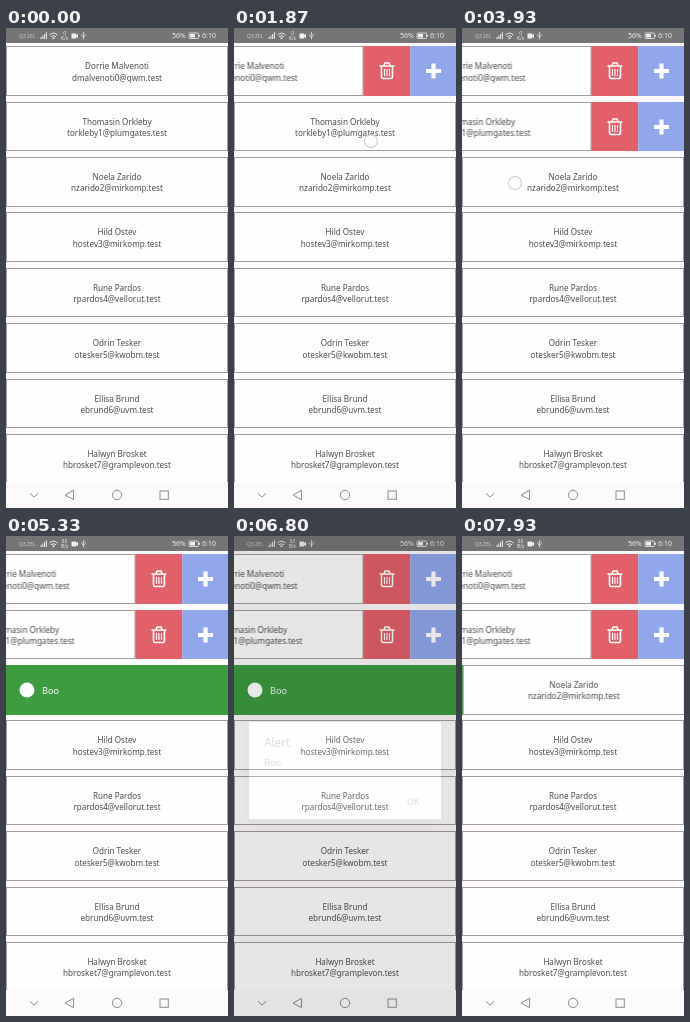
Write an HTML page that moves like this. It is 222 px wide and 480 px high and loops after 8000 ms.

```html
<!DOCTYPE html>
<html lang="en">
<head>
<meta charset="utf-8">
<title>Swipeable contact list</title>
<style>
  html, body { margin: 0; width: 100%; height: 100%; overflow: hidden; background: #fdfafc; }
  #stage {
    position: relative; width: 222px; height: 480px; overflow: hidden;
    background: #fdfafc; color: #4c4c4c;
    font: 8.1px/11.4px "Noto Sans", "Open Sans", sans-serif;
  }
  #stage > * { position: absolute; }
  svg { font-family: "Noto Sans", "Open Sans", sans-serif; }
  #list { left: 0; top: 0; }
  .row { position: absolute; left: 0; width: 222px; height: 49.6px; overflow: hidden; }
  .row > * { position: absolute; top: 0; height: 100%; }
  .card {
    box-sizing: border-box; width: 222px; padding-top: 13px;
    border: 1px solid #a19c9e; background: #fefefe; text-align: center;
  }
  .card div { white-space: nowrap; }
  .actions { left: 129.5px; width: 92.5px; }
  .boo { width: 222px; background: #3d9b40; }
  .bar { left: 0; width: 222px; }

  .row:nth-child(1) .card, .row:nth-child(2) .card, .row:nth-child(3) .card,
  #touch, #alert, .idle, .busy { animation: 8s linear infinite; }
  .row:nth-child(1) .card { animation-name: open-first; }
  .row:nth-child(2) .card { animation-name: open-second; }
  .row:nth-child(3) .card { animation-name: open-third; }

  @keyframes open-first {
    0%, 9.5% { transform: none; }
    18% { transform: translateX(-80px); animation-timing-function: ease-out; }
    22%, 100% { transform: translateX(-92.5px); }
  }
  @keyframes open-second {
    0%, 24% { transform: none; }
    36% { transform: translateX(-84px); animation-timing-function: ease-out; }
    43%, 100% { transform: translateX(-92.5px); }
  }
  @keyframes open-third {
    0%, 50% { transform: none; }
    60% { transform: translateX(130px); animation-timing-function: ease-out; }
    66%, 89% { transform: translateX(222px); }
    93.5% { transform: translateX(110px); animation-timing-function: cubic-bezier(.15, .75, .4, 1); }
    99%, 100% { transform: translateX(.8px); }
  }

  #touch {
    left: -7px; top: -7px; width: 14px; height: 14px; box-sizing: border-box;
    border: 1px solid rgba(190, 185, 190, .75); border-radius: 50%;
    background: rgba(250, 250, 252, .65);
    animation-name: drag, press !important;
  }
  @keyframes drag {
    0%, 9.5% { transform: translate(150px, 45px); }
    18%, 21% { transform: translate(70px, 45px); }
    21.01%, 24% { transform: translate(137px, 113px); }
    36%, 45% { transform: translate(53px, 113px); }
    45.01%, 50% { transform: translate(53px, 155px); }
    60%, 68% { transform: translate(183px, 155px); }
    68.01%, 76% { transform: translate(60px, 155px); }
    76.01%, 86% { transform: translate(180px, 266px); }
    86.01%, 89% { transform: translate(190px, 155px); }
    93.5%, 100% { transform: translate(78px, 155px); }
  }
  @keyframes press {
    0%, 8.3% { opacity: 0; }
    8.6%, 18% { opacity: 1; }
    18.6%, 23% { opacity: 0; }
    23.3%, 36% { opacity: 1; }
    37%, 48.7% { opacity: 0; }
    49%, 60% { opacity: 1; }
    61%, 69.9% { opacity: 0; }
    70%, 71.2% { opacity: 1; }
    72%, 81.5% { opacity: 0; }
    81.7%, 82.5% { opacity: 1; }
    83.2%, 88.4% { opacity: 0; }
    88.7%, 93.5% { opacity: 1; }
    94.3%, 100% { opacity: 0; }
  }

  #alert { inset: 0; background: rgba(0, 0, 0, .59); animation-name: alert; }
  @keyframes alert {
    0%, 71% { opacity: 0; }
    74%, 82.5% { opacity: 1; }
    85.5%, 100% { opacity: 0; }
  }
  .dialog {
    position: absolute; left: 15px; top: 186px; width: 192px; height: 97px;
    border-radius: 1px; background: #fff; box-shadow: 0 3px 9px rgba(0, 0, 0, .45);
  }
  .dialog svg { display: block; }

  .idle { animation-name: idle !important; animation-timing-function: step-end !important; }
  .busy { animation-name: busy !important; animation-timing-function: step-end !important; }
  @keyframes idle { 0% { opacity: 1; } 55%, 100% { opacity: 0; } }
  @keyframes busy { 0% { opacity: 0; } 55%, 100% { opacity: 1; } }
</style>
</head>
<body>
<div id="stage">
  <div id="list"></div>

  <svg class="bar" style="top:0" width="222" height="15" fill="#f0f0f0">
    <rect width="222" height="15" fill="#757575"/>
    <text x="13" y="9.800" font-size="5" fill="#d4d4d4">Q3 ZEL</text>
    <path d="M34.500 11V9h1v2zM36.300 11V7.500h1V11zM38.100 11V6h1v5zM39.900 11V4.300h1V11z"/>
    <g fill="none" stroke="#f0f0f0">
      <path d="M43.500 7q4-3.600 8 0M45 8.800q2.500-2.200 5 0"/>
      <path d="M77.500 4v7.500M75.800 6.500V8l1.700 1.500 1.700-2v-1.500" stroke-width=".7"/>
      <rect x="183" y="5" width="9.500" height="5.500" rx="1" stroke-width=".8"/>
    </g>
    <circle cx="47.500" cy="10.300" r="1"/>
    <g font-size="4.800" text-anchor="middle">
      <g class="idle"><text x="58.500" y="6.500">0</text><text x="58.500" y="12">K/s</text></g>
      <g class="busy"><text x="58.500" y="6.500">63</text><text x="58.500" y="12">B/s</text></g>
    </g>
    <path d="M65.500 5.500H70V7l2-1.300v4.600L70 9v1.500h-4.500zM184 6h5v3.500h-5zM193 6.900h1v1.700h-1z"/>
    <text x="166" y="10.400" font-size="7.100">56%</text>
    <text x="196" y="10.400" font-size="7">6:10</text>
  </svg>

  <svg class="bar" style="top:454px" width="222" height="26" fill="none" stroke="#8c8a8b">
    <path d="M0 0h222v26H0z" fill="#fdfafc" stroke="none"/>
    <path d="M24 11.300l4 3.900 4-3.900M67.500 8.300v9.400L59 13z"/>
    <circle cx="111" cy="13" r="4.700"/>
    <rect x="154" y="9" width="8.300" height="8.300"/>
  </svg>

  <div id="alert">
    <div class="dialog">
      <svg width="192" height="97" fill="#383838">
        <text x="15" y="24.500" font-size="11.700">Alert</text>
        <text x="15" y="43.500" font-size="9.200">Boo</text>
        <text x="158" y="83" font-size="8.800">OK</text>
      </svg>
    </div>
  </div>
  <div id="touch"></div>
</div>

<script>
  const contacts = [
    ["Dorrie Malvenoti", "dmalvenoti0@qwm.test"],
    ["Thomasin Orkleby", "torkleby1@plumgates.test"],
    ["Noela Zarido", "nzarido2@mirkomp.test"],
    ["Hild Ostev", "hostev3@mirkomp.test"],
    ["Rune Pardos", "rpardos4@vellorut.test"],
    ["Odrin Tesker", "otesker5@kwobm.test"],
    ["Ellisa Brund", "ebrund6@uvm.test"],
    ["Halwyn Brosket", "hbrosket7@gramplevon.test"]
  ];

  const actions = `
    <svg class="actions" fill="none" stroke="#fff">
      <path d="M0 0h46.250v50H0z" fill="#e2606a" stroke="none"/>
      <path d="M46.250 0h46.250v50H46.250z" fill="#91a7ea" stroke="none"/>
      <path d="M15.500 20h15M20 19.500l1-2.500h4l1 2.500M17.500 20.500v10.500q0 1.500 1.500 1.500h8q1.500 0 1.500-1.500V20.500" stroke-width="1.500"/>
      <path d="M20.500 23v7M23 23v7M25.500 23v7" stroke-width="1.100"/>
      <path d="M62 25h15M69.500 17.500v15" stroke-width="4.200"/>
    </svg>`;
  const boo = `
    <svg class="boo" fill="#fff">
      <circle cx="21" cy="25" r="7.500"/>
      <text x="36" y="28.800" font-size="9.200">Boo</text>
    </svg>`;
  const underlays = [actions, actions, boo];

  document.getElementById("list").innerHTML = contacts.map(([name, email], i) => `
    <div class="row" style="top:${(18.2 + 55.4 * i).toFixed(1)}px">
      ${underlays[i] || ""}
      <div class="card"><div>${name}</div><div>${email}</div></div>
    </div>`).join("");
</script>
</body>
</html>
```
